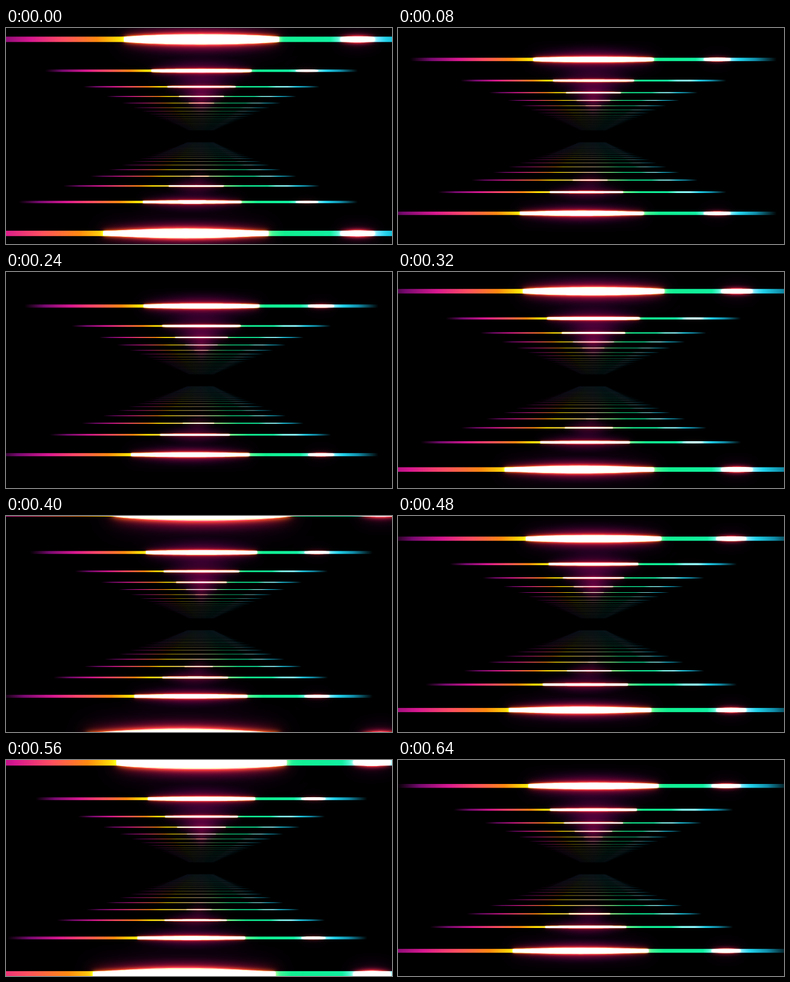
An HTML page with a canvas for the animation above (680 ms loop, 640x360 px).

```html
<!DOCTYPE html>
<html>
<head>
<meta charset="utf-8">
<style>
  html, body { margin: 0; width: 100%; height: 100%; overflow: hidden; background: #000; }
  canvas { display: block; }
</style>
</head>
<body>
<canvas id="stage" width="640" height="360"></canvas>
<script>
const ctx = document.getElementById('stage').getContext('2d');
const CX = 324, HORIZON = 180.6, DEPTH = 338, EDGE = 2.37;
const LOOP = 680, STEP = 40;

// Neon colours along a bar, by sideways position divided by distance from the horizon.
const COLORS = [
  [-2.37, '#000'], [-2.1, '#780a70'], [-1.75, '#d81890'], [-1.4, '#ff5060'],
  [-1.07, '#ff8a10'], [-0.84, '#ffe000'], [-0.45, '#ffe060'], [0, '#ffd8b0'],
  [0.45, '#90ff90'], [0.85, '#10f090'], [1.32, '#10f0a0'], [1.5, '#80fff0'],
  [1.72, '#90f8ff'], [1.9, '#20d0e8'], [2.1, '#108ca8'], [2.37, '#000']
];
const CEILING = { dir: -1, stretch: 1, left: 0.81, right: 0.81, swell: 9.5,
                  curve: 0.7, fade: 45, halo: 24, fog: 0.3 };
const FLOOR = { dir: 1, stretch: 1.17, left: 1.06, right: 0.72, swell: 9,
                curve: 1.3, fade: 60, halo: 17, fog: 0.6 };

const clamp = v => Math.max(0, Math.min(1, v));

function drawFog({ dir, stretch, fog }) {
  const near = 10, far = 42;
  const fill = ctx.createLinearGradient(0, HORIZON + dir * near, 0, HORIZON + dir * far);
  fill.addColorStop(0, `rgba(8,24,34,${fog})`);
  fill.addColorStop(1, 'rgba(8,24,34,0)');
  ctx.fillStyle = fill;
  ctx.beginPath();
  for (const [d, x] of [[near, -2 * stretch], [near, 2], [far, 2], [far, -2 * stretch]])
    ctx.lineTo(CX + d * x, HORIZON + dir * d);
  ctx.fill();
}

function drawBar(y, d, half, stretch) {
  const left = EDGE * stretch, width = left + EDGE;
  const fill = ctx.createLinearGradient(CX - left * d, 0, CX + EDGE * d, 0);
  for (const [u, color] of COLORS)
    fill.addColorStop(clamp((left + (u < 0 ? u * stretch : u)) / width), color);
  ctx.globalAlpha = clamp(d / 60);
  ctx.fillStyle = fill;
  ctx.fillRect(CX - left * d, y - half, width * d, half * 2);
  ctx.globalAlpha = 1;
}

function drawHalo(x, y, rx, ry, strength) {
  const fill = ctx.createRadialGradient(0, 0, 0, 0, 0, 1);
  fill.addColorStop(0, `rgba(140,0,70,${strength})`);
  fill.addColorStop(0.5, `rgba(85,0,60,${strength * 0.75})`);
  fill.addColorStop(1, 'rgba(30,0,40,0)');
  ctx.save();
  ctx.translate(x, y);
  ctx.scale(rx, ry);
  ctx.fillStyle = fill;
  ctx.fillRect(-1, -1, 2, 2);
  ctx.restore();
}

// Glowing lens: as thick as the bar at both ends, swelling in the middle.
function drawCore(x, y, rx, end, middle, curve, alpha) {
  const glow = [
    ['#600060', 1, 14 + middle * 2.4],
    ['#c01800', 1, 3 + middle * 1.4],
    ['#ff9000', 0.9, 1 + middle * 0.6],
    ['#ffffff', 0.72, 2]
  ];
  ctx.save();
  ctx.globalAlpha = alpha;
  for (const [color, size, blur] of glow) {
    const height = s => end + (middle * size - end) * clamp(1 - s * s) ** curve;
    ctx.beginPath();
    for (let s = -1; s <= 1.001; s += 0.05) ctx.lineTo(x + s * rx, y - height(s));
    for (let s = 1; s >= -1.001; s -= 0.05) ctx.lineTo(x + s * rx, y + height(s));
    ctx.fillStyle = ctx.shadowColor = color;
    ctx.shadowBlur = blur;
    ctx.fill();
  }
  ctx.restore();
}

function drawLine(d, side) {
  const y = HORIZON + side.dir * d;
  const half = d * d / DEPTH * 0.058;
  drawBar(y, d, half, side.stretch);

  const size = d * (1 - (side.fade / d) ** 3);
  if (size > 8) {
    const l = side.left * size, r = side.right * size;
    const x = CX + (r - l) / 2, rx = (l + r) / 2;
    const middle = Math.max(half, side.swell * (d / 162) ** 2.8);
    const heat = clamp((d - side.fade) / 60);
    drawHalo(x, y, rx * 1.15, side.halo + middle, 0.45 * clamp(heat * 3));
    drawCore(x, y, rx, half * 0.8, middle, side.curve, heat);
  }

  const spark = clamp((d - 100) / 55);
  if (spark) {
    const x = CX + 1.6 * d;
    drawHalo(x, y, d * 0.28, 4 + half * 2, spark * 0.7);
    drawCore(x, y, d * 0.17, half * 0.5, half * 1.2, 1, spark * 0.8);
  }
}

function draw(time) {
  const phase = 2.09 - 0.2269 * Math.floor(time % LOOP / STEP);
  const first = 1 + phase - Math.floor(phase);
  ctx.globalCompositeOperation = 'source-over';
  ctx.fillStyle = '#000';
  ctx.fillRect(0, 0, 640, 360);
  ctx.globalCompositeOperation = 'lighter';
  for (const side of [CEILING, FLOOR]) {
    drawFog(side);
    for (let z = first; z < 34; z++)
      if (DEPTH / z < 188) drawLine(DEPTH / z, side);
  }
}

const start = performance.now();
function tick() {
  draw(performance.now() - start);
  requestAnimationFrame(tick);
}
tick();
</script>
</body>
</html>
```
